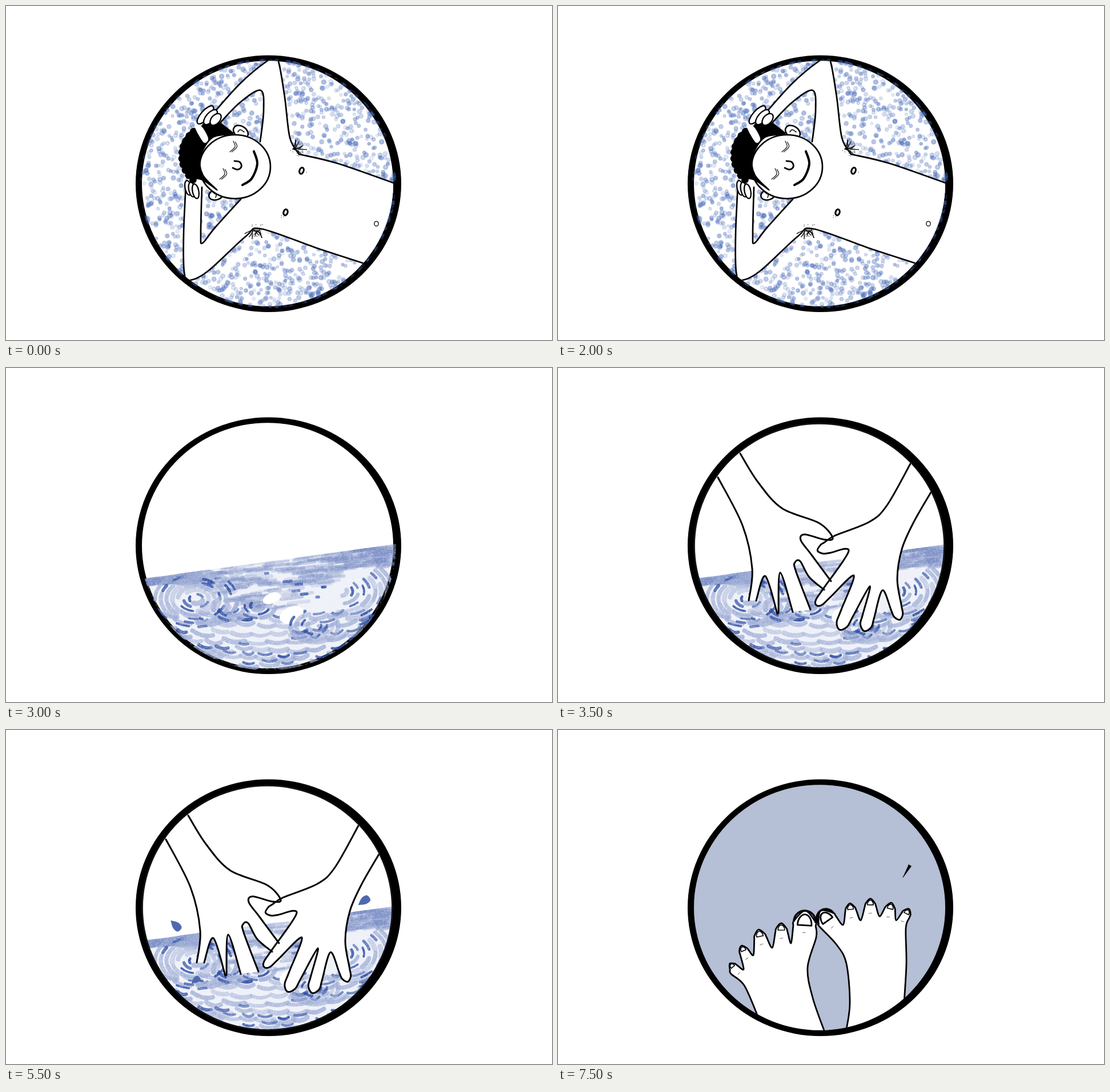
An HTML page with a canvas for the animation above (8 s loop, 956 px wide and 586 px high).

```html
<!DOCTYPE html>
<html lang="en">
<head>
<meta charset="utf-8">
<title>Bath time</title>
<style>
html, body { margin: 0; width: 100%; height: 100%; overflow: hidden; background: #fff; }
canvas { display: block; }
</style>
</head>
<body>
<canvas id="stage" width="956" height="586"></canvas>
<script>
const W = 956, H = 586, STEP = 500, LOOP = 8000;
const stage = document.getElementById('stage').getContext('2d');
let g, seed = 1;

function rnd() {
  seed = (seed + 0x6D2B79F5) | 0;
  let t = Math.imul(seed ^ (seed >>> 15), 1 | seed);
  t = (t + Math.imul(t ^ (t >>> 7), 61 | t)) ^ t;
  return ((t ^ (t >>> 14)) >>> 0) / 4294967296;
}
const range = (a, b) => a + (b - a) * rnd();
const mix = (a, b, k) => a + (b - a) * k;

// Smooth run through flat x,y lists; several lists are joined with straight lines.
function path(...runs) {
  const out = new Path2D();
  runs.forEach((p, k) => {
    const n = p.length / 2;
    const at = i => { i = Math.max(0, Math.min(n - 1, i)) * 2; return [p[i], p[i + 1]]; };
    out[k ? 'lineTo' : 'moveTo'](p[0], p[1]);
    for (let i = 0; i < n - 1; i++) {
      const [a, b, c, d] = [at(i - 1), at(i), at(i + 1), at(i + 2)];
      out.bezierCurveTo(b[0] + (c[0] - a[0]) / 6, b[1] + (c[1] - a[1]) / 6,
        c[0] - (d[0] - b[0]) / 6, c[1] - (d[1] - b[1]) / 6, c[0], c[1]);
    }
  });
  return out;
}
function oval(x, y, rx, ry = rx, rot = 0) {
  const o = new Path2D();
  o.ellipse(x, y, rx, ry, rot, 0, 7);
  return o;
}
function ink(p, w = 2.7, color = '#000') {
  g.lineWidth = w;
  g.strokeStyle = color;
  g.stroke(p);
}
function paint(p, fill = '#fff', w = 0) {
  g.fillStyle = fill;
  g.fill(p);
  if (w) ink(p, w);
}
const line = (p, w, color) => ink(path(p), w, color);

const outer = oval(459.5, 311.7, 232.5, 225.3);
const inner = oval(458, 311.5, 220, 215.3);
const tight = oval(457.5, 312, 217.7, 213.2);
const spill = oval(459, 311.5, 224, 219);

function ring(hole = inner) {
  const r = new Path2D(outer);
  r.addPath(hole);
  g.fillStyle = '#000';
  g.fill(r, 'evenodd');
}
function clipped(area, draw) {
  g.save();
  g.clip(area);
  draw();
  g.restore();
}
function layer(draw) {
  const c = document.createElement('canvas');
  c.width = W;
  c.height = H;
  g = c.getContext('2d');
  g.lineCap = g.lineJoin = 'round';
  g.fillStyle = '#fff';
  g.fillRect(0, 0, W, H);
  draw();
  return c;
}

// Outline of a hand or foot; each digit is [x, y, radius, gapX, gapY] with the gap that follows it.
function digits(start, tips, end) {
  const pts = [...start], nails = [];
  for (const [x, y, r, gx = end[0], gy = end[1]] of tips) {
    const [px, py] = pts.slice(-2);
    let dx = x - (px + gx) / 2, dy = y - (py + gy) / 2;
    const len = Math.hypot(dx, dy);
    dx *= r / len;
    dy *= r / len;
    const side = Math.sign((gx - px) * dy - (gy - py) * dx);
    const sx = -dy * side, sy = dx * side;
    pts.push(mix(px, x + sx, .75), mix(py, y + sy, .75), x + sx, y + sy, x + dx, y + dy,
      x - sx, y - sy, mix(x - sx, gx, .25), mix(y - sy, gy, .25), gx, gy);
    nails.push([x, y, r, Math.atan2(dy, dx) + Math.PI / 2]);
  }
  return { pts: [...pts, ...end.slice(2)], nails };
}

// Sunbather
function dots() {
  seed = 42;
  for (let i = 0; i < 2500; i++) {
    const x = range(228, 692), y = range(86, 538), r = range(3.2, 4.9);
    paint(oval(x, y, r), `rgba(78,112,188,${range(.1, .46)})`);
    ink(oval(x, y, r * .6), 1, `rgba(60,92,172,${range(.05, .3)})`);
  }
}
function specks(x, y, n, size) {
  g.fillStyle = '#444';
  for (let i = 0; i < n; i++) g.fillRect(x + range(-size, size), y + range(-size, size), 1.2, 1.2);
}
function tuft(x, y, dir) {
  for (let i = 0; i < 9; i++) {
    const a = dir + (i / 8 - .5) * 2.2, l = range(9, 17), sx = x + range(-7, 7);
    line([sx, y, sx + Math.cos(a) * l, y + Math.sin(a) * l], 1.3);
  }
  specks(x, y, 24, 12);
}
function lid(x, y) {
  for (const d of [0, 3.5]) line([x + d, y + d / 2, x + d + 3, y + 10, x + d - 6, y + 19], 1.3, '#222');
}
function sunbather() {
  ring();
  clipped(spill, dots);

  const armTop = [364, 187, 410, 136, 455, 98, 467, 95, 477, 97, 488, 160, 497, 231, 513, 260];
  const flankTop = [513, 260, 580, 276, 680, 311];
  const flankLow = [628, 452, 545, 425, 447, 391, 420, 404, 355, 464, 322, 481, 312, 467, 311, 400, 315, 312];
  const holeTop = [372, 208, 410, 169, 446, 148, 451, 185, 445, 238];
  const holeLow = [343, 318, 341, 400, 344, 416, 365, 390, 411, 339];
  const body = path(armTop, flankTop, [700, 315, 660, 460], flankLow, [345, 235, 355, 205]);
  body.addPath(path(holeTop, [425, 238, 395, 225]));
  body.addPath(path(holeLow, [385, 325]));
  clipped(inner, () => {
    g.fillStyle = '#fff';
    g.fill(body, 'evenodd');
    [armTop, flankTop, flankLow, holeTop, holeLow].forEach(p => line(p));
  });

  // head
  paint(oval(411, 221, 14, 10, .6), '#fff', 2.5);
  paint(oval(368, 331, 13, 9, -.3), '#fff', 2.5);
  line([406, 221, 410, 217, 417, 221], 1.5);
  line([362, 327, 368, 331, 367, 336], 1.5);
  paint(oval(401, 282, 62, 56), '#fff', 2.7);
  paint(path([398, 223, 368, 202, 343, 210, 346, 232, 328, 218, 308, 240, 306, 275, 322, 299, 345, 306, 370, 323, 345, 296, 341, 264, 362, 231, 398, 226]), '#000', 1.5);
  for (let a = 2.3; a < 4.1; a += .19) paint(oval(366 + 58 * Math.cos(a), 263 + 56 * Math.sin(a), 6.5), '#000');
  paint(path([330, 211, 342, 211, 354, 232, 347, 240, 336, 224, 330, 211]));

  for (let i = 0; i < 3; i++) {
    paint(oval(349 + i * 9, 191 + i * 4, 20 - i * 4, 7.5, -.85), '#fff', 2.3);
    paint(oval(319 + i * 6.5, 319 + i * 3, 5.5, 13, -.2), '#fff', 2.3);
  }

  lid(398, 237);
  lid(380, 285);
  line([434, 255, 440, 277, 430, 303, 414, 314], 4);
  ink(oval(517.5, 289, 3.6, 5.6, .35), 3);
  ink(oval(489.5, 362, 3.6, 5.4, .3), 3);
  ink(oval(648.5, 382, 3.7, 4.2), 1.3);
  seed = 9;
  specks(522, 288, 5, 8);
  specks(485, 363, 5, 8);
  tuft(508, 251, -.5);
  tuft(438, 393, 1.6);
}
function nose(k) {
  g.save();
  g.translate(404, 279);
  g.scale(k, k);
  line([-4, -7, 4, -6, 8, -1, 7, 5, 1, 8, -7, 5], 2.8);
  g.restore();
}

// Water
const level = x => 369 - (x - 245) * .137;
const pale = () => `rgba(158,173,214,${range(.45, .8)})`;
const deep = () => `rgba(44,76,164,${range(.55, .9)})`;

function dash(x, y, len, bend, w, color, tilt) {
  const h = len / 2, p = new Path2D();
  p.moveTo(x - h, y - h * tilt);
  p.quadraticCurveTo(x, y + bend * 2, x + h, y + h * tilt);
  ink(p, w, color);
}
function whirl(cx, cy, max, from, to) {
  for (let r = 12; r < max; r += 10) {
    for (let a = from + range(0, .4); a < to;) {
      const arc = Math.min(range(22, 46) / r, 1.6), dark = rnd() < .4, p = new Path2D();
      p.ellipse(cx, cy, r, r * .68, 0, a, a + arc * (dark ? .6 : 1));
      ink(p, dark ? range(3.5, 5.5) : range(6, 9), dark ? deep() : pale());
      a += arc + 8 / r;
    }
  }
}
function waves() {
  for (let y = 436; y < 532; y += 14) {
    for (let x = 275 + range(0, 20); x < 645; x += range(28, 40)) {
      const yy = y + range(-5, 5), tilt = (460 - x) / 500;
      dash(x, yy, range(24, 38), range(2, 5), range(6, 9), pale(), tilt);
      if (rnd() < .5) dash(x, yy - 6, range(13, 24), range(1, 4), range(4, 6), deep(), tilt);
    }
  }
}
function surface() {
  for (let i = 0; i < 330; i++) {
    const x = range(240, 684);
    const depth = 12 + 78 * Math.exp(-(((x - 475) / 105) ** 2)) + Math.max(0, x - 590) * .3;
    dash(x, level(x) + Math.pow(rnd(), 1.1) * depth, range(18, 42), range(-1, 1), range(4, 7),
      `rgba(122,141,196,${range(.2, .42)})`, -.12);
  }
  for (let i = 0; i < 10; i++) dash(range(350, 580), range(354, 405), range(3, 14), 0, 5, deep(), -.1);
}
function water() {
  seed = 77;
  const pool = path([230, level(230), 690, level(690)], [690, 540, 230, 540]);
  clipped(pool, () => clipped(spill, () => {
    paint(inner, 'rgba(178,190,224,.22)');
    waves();
    surface();
    paint(oval(500, 433, 22, 14, -.4));
    paint(oval(465, 404, 16, 9, -.4));
    whirl(333, 405, 82, 0, 6.28);
    whirl(540, 452, 50, -.4, 3.6);
    whirl(585, 392, 95, -.75, 1.3);
    whirl(395, 421, 42, .1, 3);
    whirl(440, 417, 38, .1, 3);
    for (let i = 0; i < 12000; i++) {
      const x = range(240, 684);
      g.fillStyle = `rgba(255,255,255,${range(.1, .45)})`;
      g.fillRect(x, range(level(x), 532), 1.2, 1.2);
    }
  }));
}
function drop(x, y, len, rot) {
  g.save();
  g.translate(x, y);
  g.rotate(rot);
  const h = len / 2;
  paint(path([-h, 0, 0, -h * .55, h * .8, -h * .4, h * .8, h * .4, 0, h * .5, -h, 0]), '#5069ae');
  g.restore();
}

function hands() {
  water();
  ring(tight);
  ink(oval(457.5, 312, 219.5, 215), .6, '#444');
  const leftSide = [280, 192, 323, 276, 340, 352, 334, 408];
  const gaps = [[347, 408, 363, 365, 384, 431], [386, 430, 389, 359, 411, 428],
    [442, 424, 416, 355, 415, 341, 424, 339, 440, 367, 466, 389]];
  const thumb = [478, 374, 444, 328, 425, 302, 432, 292, 466, 301, 481, 298, 457, 272, 392, 246, 350, 200, 319, 150];
  const right = digits([617, 168, 576, 241, 545, 270, 485, 294],
    [[462, 318, 8, 509, 321], [457, 411, 7, 518, 364], [497, 450, 10, 546, 383], [539, 452, 10, 568, 390], [596, 434, 8]],
    [594, 370, 602, 318, 622, 272, 653, 218]).pts;
  clipped(tight, () => {
    paint(path(leftSide, ...gaps, thumb, [290, 140]));
    paint(path(right, [660, 150]));
    [leftSide, ...gaps, thumb, right].forEach(p => line(p, 3));
  });
}

// Feet
function foot(start, toes, end) {
  const { pts, nails } = digits(start, toes, end);
  paint(path(pts, [end.at(-2), 570, start[0], 570]));
  line(pts, 2.8);
  for (const [x, y, r, rot] of nails) {
    g.save();
    g.translate(x, y);
    g.rotate(rot);
    const nail = new Path2D(), big = r > 12;
    nail.ellipse(0, r * .35, r * .65, r, 0, Math.PI, 0);
    nail.closePath();
    paint(nail, '#fff', big ? 2.8 : 1.6);
    if (big) {
      const rim = new Path2D();
      rim.arc(0, 0, r, Math.PI, 0);
      ink(rim, 3.6);
    }
    const k = big ? 20 : 18;
    line([-2.5, k, 2.5, k - 1], .9, '#555');
    g.restore();
  }
}
function feet() {
  paint(inner, '#b5bfd5');
  clipped(inner, () => {
    foot([349, 500, 326, 448, 303, 428],
      [[305, 414, 6, 325, 420], [324, 385, 7, 342, 395], [353, 359, 9, 375, 382], [391, 348, 9, 408, 374], [432, 336, 19]],
      [452, 364, 437, 417, 446, 470, 467, 530]);
    foot([504, 530, 511, 480, 505, 410, 488, 377, 458, 345],
      [[469, 330, 16, 499, 342], [512, 312, 8, 530, 334], [547, 304, 8, 563, 327], [582, 311, 8, 592, 334], [611, 320, 7]],
      [609, 348, 610, 410, 606, 478]);
  });
  ring();
}
function tick(x, y, len, rot) {
  g.save();
  g.translate(x, y);
  g.rotate(rot);
  paint(path([len / 2, 0], [-len / 2, -2.6], [-len / 2, 2.6]), '#000', 1);
  g.restore();
}

const scenes = {
  sun: layer(sunbather),
  empty: layer(() => ring()),
  pool: layer(() => { ring(); water(); }),
  hands: layer(hands),
  feet: layer(feet)
};
const splashes = [
  [],
  [[378, 449, 17, .6], [549, 479, 17, -.6]],
  [[465, 508, 24, .5]],
  [[298, 365, 20, .8], [644, 331, 22, -.6]],
  [[297, 343, 25, .8], [627, 300, 25, -.6], [332, 439, 19, -.7]]
];
const ticks = [[271, 399.5, 17, -.05], [287, 316, 24, .85], [442.5, 254, 31, 1.54], [610, 248, 24, 2.1]];

function draw(now) {
  const n = Math.floor((now % LOOP) / STEP);
  const name = n < 5 ? 'sun' : n < 6 ? 'empty' : n < 7 ? 'pool' : n < 12 ? 'hands' : 'feet';
  g = stage;
  g.lineCap = g.lineJoin = 'round';
  g.drawImage(scenes[name], 0, 0);
  if (name === 'sun') nose(n % 2 ? .88 : 1);
  if (name === 'hands') splashes[n - 7].forEach(d => drop(...d));
  if (name === 'feet') tick(...ticks[n - 12]);
}
let start;
function loop(now) {
  start ??= now;
  draw(now - start);
  requestAnimationFrame(loop);
}
draw(0);
requestAnimationFrame(loop);
</script>
</body>
</html>
```
